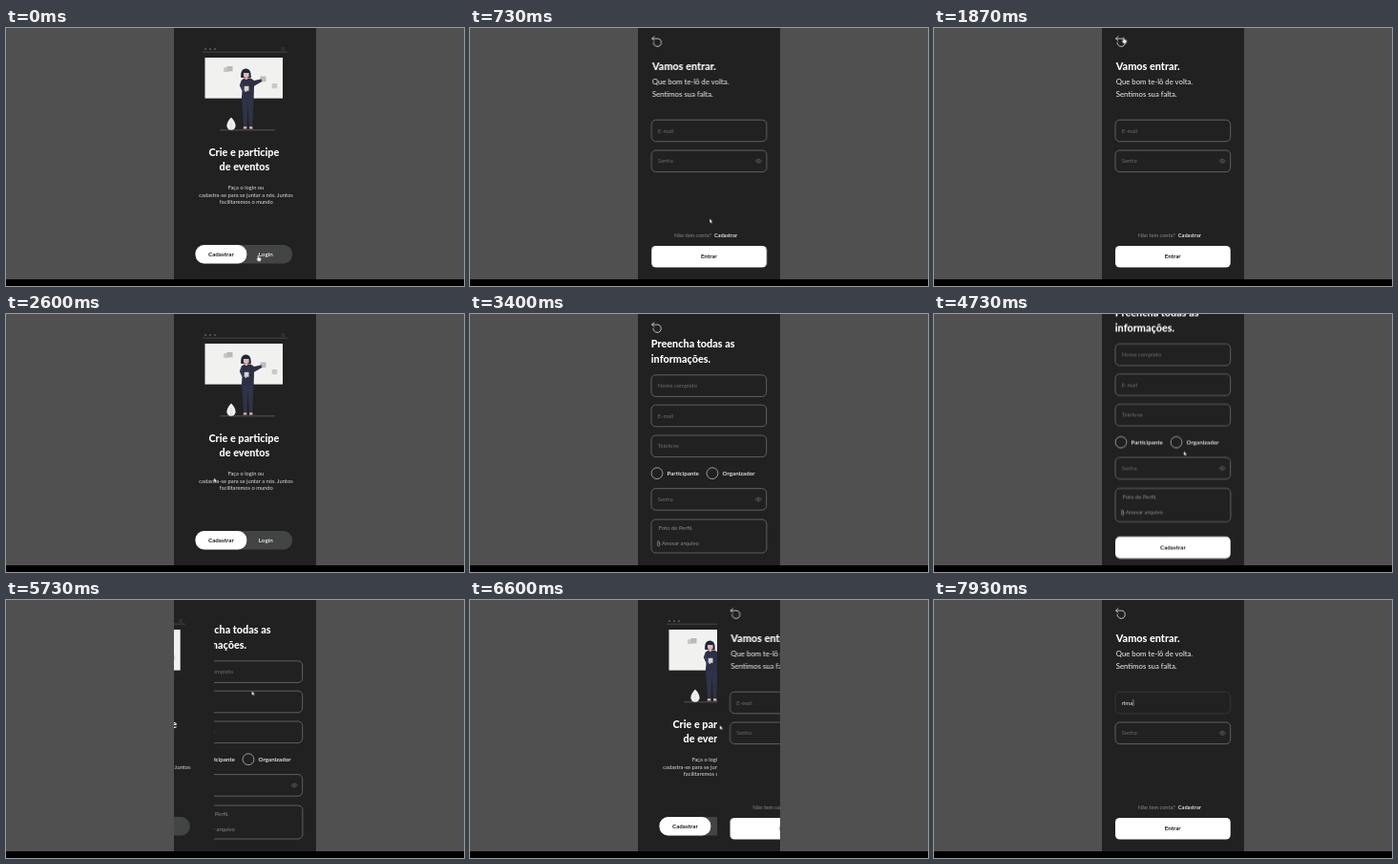
An HTML page that plays this animation: 480x270 px, repeating every 8000 ms.

```html
<!DOCTYPE html>
<html lang="pt">
<head>
<meta charset="utf-8">
<title>Eventos</title>
<style>
  html, body { margin: 0; width: 100%; height: 100%; overflow: hidden; background: #505050; }
  svg { display: block; width: 100%; height: 100%; font-family: Lato, "Open Sans", sans-serif; }

  .bg { fill: #212121; }
  .box { fill: none; stroke: #747474; stroke-width: .75; }
  .line { fill: none; stroke: #e4e4e4; stroke-width: .8; stroke-linecap: round; stroke-linejoin: round; }
  .eye { fill: none; stroke: #696969; stroke-width: .65; }
  .white { fill: #fff; }
  .title { font-size: 10.85px; font-weight: 800; fill: #fff; }
  .lead { font-size: 7.75px; fill: #f2f2f2; }
  .small { font-size: 5.75px; fill: #dcdcdc; }
  .hint { font-size: 5.9px; fill: #6c6c6c; }
  .file { font-size: 5.9px; fill: #8a8a8a; }
  .label { font-size: 6.25px; font-weight: 600; fill: #f4f4f4; }
  .btn { font-size: 6.2px; font-weight: 700; fill: #191919; }
  .mid { text-anchor: middle; }

  .slide, .scroll, .cursor, .hand, .arrow, .caret { animation: 8s linear infinite; }
  .right { transform: translateX(150px); }
  .left { transform: translateX(-150px); }
  .login1 { animation-name: login1; }
  .home2 { animation-name: home2; }
  .register { animation-name: register; }
  .home3 { animation-name: home3; }
  .login2 { animation-name: login2; }

  @keyframes login1 {
    0%, 5.5% { transform: translateX(150px); animation-timing-function: ease-out; }
    9.25%, 100% { transform: none; }
  }
  @keyframes home2 {
    0%, 26.25% { transform: translateX(-150px); animation-timing-function: ease-out; }
    30%, 100% { transform: none; }
  }
  @keyframes register {
    0%, 37.19% { transform: translateX(150px); animation-timing-function: ease-out; }
    40.94%, 100% { transform: none; }
  }
  @keyframes home3 {
    0%, 70.95% { transform: translateX(-150px); animation-timing-function: ease-out; }
    74.7%, 100% { transform: none; }
  }
  @keyframes login2 {
    0%, 81.375% { transform: translateX(150px); animation-timing-function: ease-out; }
    85.125%, 100% { transform: none; }
  }

  .scroll { animation-name: scroll; animation-timing-function: ease-in-out; }
  @keyframes scroll {
    0%, 46.25% { transform: none; }
    54.375%, 59.375% { transform: translateY(-32.5px); }
    64.375%, 100% { transform: none; }
  }

  /* shown from the delay on, reset while the layer is off stage */
  .on { opacity: 0; fill-opacity: 0; animation: on 8s var(--at) step-end infinite; }
  @keyframes on {
    0% { opacity: 1; fill-opacity: 1; }
    20%, 100% { opacity: 0; fill-opacity: 0; }
  }

  .caret { animation-name: caret; animation-timing-function: step-end; }
  @keyframes caret {
    0% { transform: none; }
    94.125% { transform: translateX(2.4px); }
    95.75% { transform: translateX(3.8px); }
    97.5% { transform: translateX(8.6px); }
    98.75%, 100% { transform: translateX(11.8px); }
  }

  .cursor { animation-name: move; animation-timing-function: ease-in-out; }
  @keyframes move {
    0%, 5.875% { transform: translate(264px, 237.5px); }
    15.875%, 16.625% { transform: translate(206px, 66px); }
    20%, 23.3% { transform: translate(197.8px, 9.5px); }
    23.375%, 26.25% { transform: translate(198.5px, 9.5px); }
    36.25%, 37.19% { transform: translate(226px, 238px); }
    40.625% { transform: translate(262px, 190px); }
    45%, 64.375% { transform: translate(261.7px, 143.5px); }
    68.75%, 69.875% { transform: translate(196px, 12px); }
    71.625% { transform: translate(257.5px, 95px); }
    77.5%, 80.5% { transform: translate(268px, 238px); }
    82.5% { transform: translate(261.7px, 131px); }
    86.25%, 100% { transform: translate(262px, 106px); }
  }
  .hand { animation-name: hand; animation-timing-function: step-end; }
  @keyframes hand {
    0%, 18.75%, 35%, 67.875%, 76.5% { opacity: 1; }
    7%, 28.125%, 38.25%, 70.25%, 81%, 100% { opacity: 0; }
  }
  .arrow { animation-name: arrow; animation-timing-function: step-end; }
  @keyframes arrow {
    7%, 28.125%, 38.25%, 44.375%, 70.25%, 81% { opacity: 1; }
    0%, 18.75%, 35%, 40.625%, 67.875%, 76.5%, 83.75%, 100% { opacity: 0; }
  }
</style>
</head>
<body>
<svg viewBox="0 0 480 270" preserveAspectRatio="none">
  <defs>
    <clipPath id="phone"><rect x="176" width="149" height="263"/></clipPath>
    <rect id="page" class="bg" x="176" width="149" height="263"/>
    <rect id="field" class="box" x="190" width="120.7" height="22.6" rx="4.6"/>
    <rect id="button" class="white" x="190" width="120.7" height="22.6" rx="4.6"/>
    <path id="back" class="line" d="M193 8.8 190.6 11.1 193 13.4M190.8 11.1H196.2A4.1 4.1 0 1 1 192 15.2"/>
    <g id="eye" class="eye">
      <path d="M299 0Q302.2-4 305.4 0Q302.2 4 299 0Z"/>
      <circle cx="302.2" r="1"/>
    </g>

    <g id="art">
      <path d="M206 25.2H295" stroke="#575757" stroke-width=".7"/>
      <g fill="#5a5a5a">
        <circle cx="209" cy="22" r="1.1"/><circle cx="214" cy="22" r="1.1"/><circle cx="219" cy="22" r="1.1"/>
      </g>
      <path d="M288.5 21H292M288.5 23H292" stroke="#505050" stroke-width=".7"/>
      <rect x="208.5" y="31" width="81.5" height="42.6" fill="#f1f2f0"/>
      <g fill="#c9c9c7">
        <rect x="228" y="41.2" width="5" height="4.8"/>
        <rect x="231.5" y="40" width="6" height="5.4" fill="#b9b9b7"/>
        <rect x="266.5" y="50.5" width="6" height="5.6" fill="#bcbcba"/>
        <rect x="278.7" y="58" width="5.5" height="5.2"/>
      </g>
      <path d="M224 106.8H282" stroke="#6a6a6a" stroke-width=".7"/>
      <path d="M236 93.5C238.5 96 240.6 99.5 240.6 102.3A4.6 4.5 0 0 1 231.4 102.3C231.4 99.5 233.5 96 236 93.5Z" fill="#eeeeec"/>
      <path d="M236 107V98" stroke="#bbb" stroke-width=".4"/>
      <path d="M247 73H259.5L258.2 103.5H255L253.4 80 252.4 103.5H249.2Z" fill="#303348"/>
      <path d="M249 103.2H252.3V105.4H248.6ZM255 103.2H258.2L258.7 105.4H255Z" fill="#d9b7b4"/>
      <path d="M250 52.5H256.5L260 55 268.3 53.3 268.8 55.8 260 60.8 259.6 75H246.8L247.5 66 244.8 60 246.8 54.4Z" fill="#2c2f45"/>
      <path d="M246.8 58 247.7 64 251 66.2" fill="none" stroke="#3d4058" stroke-width="1.4"/>
      <circle cx="268.8" cy="54.4" r="1.2" fill="#e0b4b0"/>
      <rect x="249.7" y="60.8" width="4.8" height="5" fill="#d5d5d3"/>
      <circle cx="251.4" cy="66" r="1" fill="#e0b4b0"/>
      <path d="M246.2 52C245.8 45.8 247.3 42.4 251.4 42.4S257 45.8 256.7 52Z" fill="#232538"/>
      <path d="M249 47H254.6V50.2Q251.8 54.4 249 50.2Z" fill="#e2b8b4"/>
      <path d="M250.6 51H253V54H250.6Z" fill="#d9aaa6"/>
    </g>

    <g id="home">
      <use href="#page"/>
      <use href="#art"/>
      <g class="title mid">
        <text x="249.4" y="133.6">Crie e participe</text>
        <text x="250" y="148.6">de eventos</text>
      </g>
      <g class="small mid">
        <text x="251.5" y="169">Faça o login ou</text>
        <text x="251.5" y="176.7">cadastra-se para se juntar a nós. Juntos</text>
        <text x="251.8" y="184.4">facilitaremos o mundo</text>
      </g>
      <rect x="198.5" y="227" width="101.5" height="19.5" rx="9" fill="#434444"/>
      <rect class="white" x="198.5" y="227" width="53.8" height="19.5" rx="9"/>
      <text class="btn mid" x="225.4" y="238.8">Cadastrar</text>
      <text class="label mid" x="272.3" y="238.8">Login</text>
    </g>

    <g id="login">
      <use href="#page"/>
      <use href="#back"/>
      <text class="title" x="190.8" y="44">Vamos entrar.</text>
      <g class="lead">
        <text x="190.8" y="59.2">Que bom te-lô de volta.</text>
        <text x="190.8" y="71.5">Sentimos sua falta.</text>
      </g>
      <use href="#field" y="96.2"/>
      <text class="hint" x="196.8" y="109.5">E-mail</text>
      <use href="#field" y="128"/>
      <text class="hint" x="196.8" y="141.3">Senha</text>
      <use href="#eye" y="139.3"/>
      <text x="213.8" y="219.3" font-size="5.65" fill="#8b8b8b">Não tem conta?</text>
      <text x="255.8" y="219.3" font-size="5.65" font-weight="600" fill="#f4f4f4">Cadastrar</text>
      <use href="#button" y="228"/>
      <text class="btn mid" x="250.2" y="241.3">Entrar</text>
    </g>
  </defs>

  <rect width="480" height="270" fill="#505050"/>
  <rect y="263" width="480" height="7" fill="#000"/>

  <g clip-path="url(#phone)">
    <use href="#home"/>
    <g class="slide right login1"><use href="#login"/></g>
    <g class="slide left home2"><use href="#home"/></g>

    <g class="slide right register">
      <use href="#page"/>
      <g class="scroll">
        <use href="#back"/>
        <g class="title">
          <text x="189.8" y="35.3">Preencha todas as</text>
          <text x="189.8" y="50.6">informações.</text>
        </g>
        <use href="#field" y="63.8"/>
        <use href="#field" y="95.2"/>
        <use href="#field" y="127"/>
        <use href="#field" y="182.6"/>
        <g class="hint">
          <text x="196.8" y="77.2">Nome completo</text>
          <text x="196.8" y="108.5">E-mail</text>
          <text x="196.8" y="140.2">Telefone</text>
          <text x="196.8" y="196">Senha</text>
        </g>
        <use href="#eye" y="194"/>
        <g fill="none" stroke="#b5b5b5" stroke-width=".8">
          <circle cx="196" cy="166.7" r="5.9"/>
          <circle cx="254" cy="166.7" r="5.9"/>
        </g>
        <g class="label">
          <text x="206.5" y="168.8">Participante</text>
          <text x="264.5" y="168.8">Organizador</text>
        </g>
        <rect class="box" x="190" y="215" width="120.9" height="35" rx="4.6"/>
        <g class="file">
          <text x="197.7" y="226">Foto de Perfil.</text>
          <text x="200.9" y="242.2">Anexar arquivo</text>
        </g>
        <path d="M198.8 238.8V242A1.1 1.1 0 0 1 196.6 242V238.4A.8 .8 0 0 1 198.2 238.4V241.5" fill="none" stroke="#a2a2a2" stroke-width=".6"/>
        <use href="#button" y="265.6"/>
        <text class="btn mid" x="250.4" y="278.8">Cadastrar</text>
      </g>
    </g>

    <g class="slide left home3"><use href="#home"/></g>

    <g class="slide right login2">
      <use href="#login"/>
      <g class="on" style="--at: 6.96s">
        <rect class="bg" x="189" y="95" width="123" height="25"/>
        <rect x="190" y="96.2" width="120.7" height="22.6" rx="4.6" fill="none" stroke="#3d3d3d" stroke-width=".75"/>
        <text class="hint" x="196.8" y="109.5">E-mail</text>
        <g class="on" style="--at: 7.53s">
          <rect class="bg" x="195" y="101" width="24" height="12"/>
          <text x="196.8" y="109.5" font-size="5.9" fill="#f4f4f4"><tspan class="on" style="--at: 7.53s">r</tspan><tspan class="on" style="--at: 7.66s">l</tspan><tspan class="on" style="--at: 7.8s">m</tspan><tspan class="on" style="--at: 7.9s">a</tspan></text>
        </g>
        <path class="caret" d="M197 104V111" stroke="#d0d0d0" stroke-width=".6"/>
      </g>
    </g>

    <g class="cursor">
      <path class="hand" d="M-.5 .6Q.2-.3 .9 .6V2.6L3.1 3.1Q3.7 3.4 3.5 4.3L2.9 6.7H.1L-1.6 4.3Q-1.6 3.4-.5 3.9Z" fill="#fff" stroke="#222" stroke-width=".35"/>
      <path class="arrow" d="M0 0V4.6L1.1 3.7 1.9 5.2 2.7 4.8 2 3.4H3.3Z" fill="#fff" stroke="#111" stroke-width=".3"/>
    </g>
  </g>
</svg>
</body>
</html>
```
